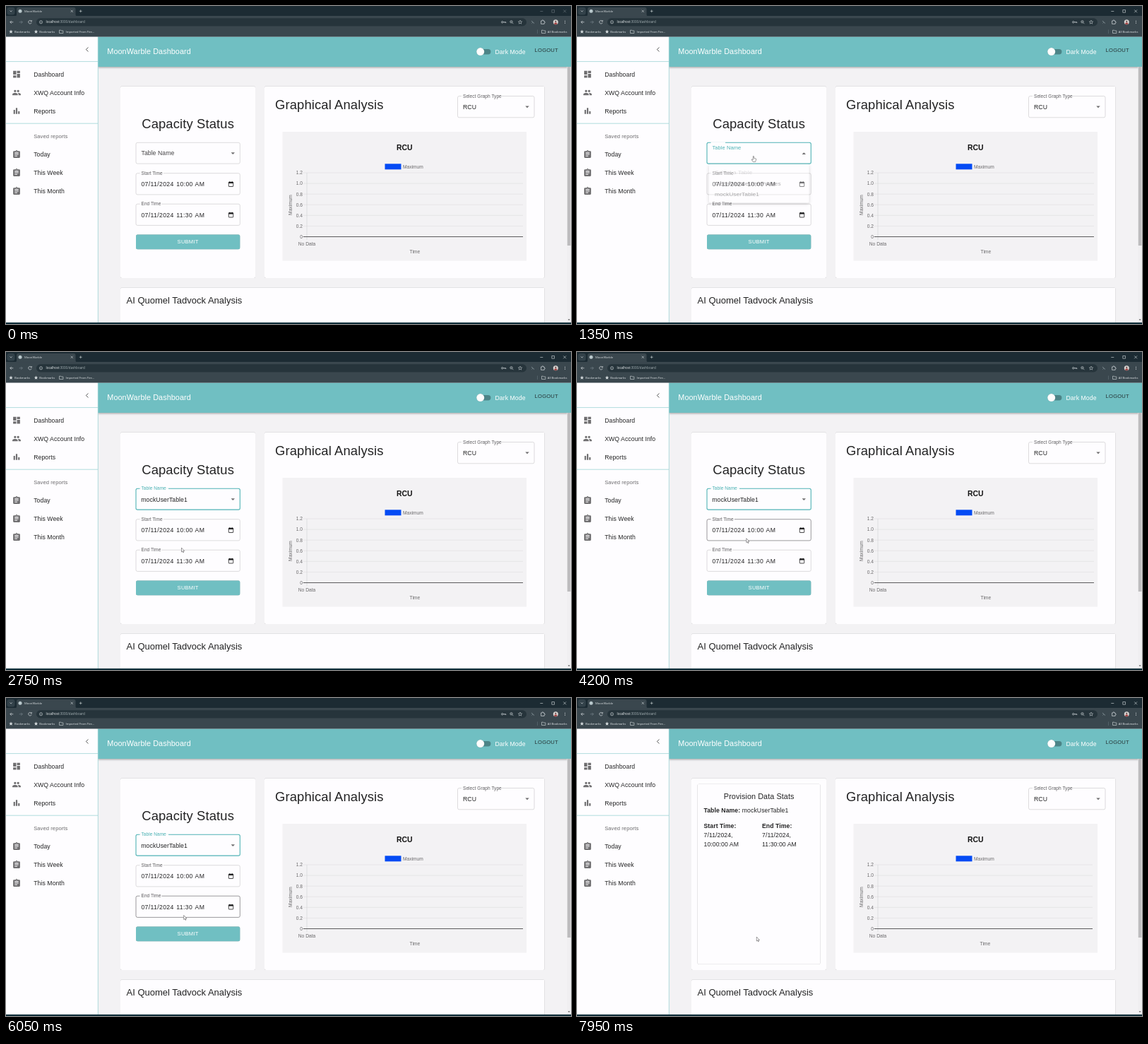
An HTML page that plays this animation: 800 by 450 pixels, repeating every 8 s.

```html
<!DOCTYPE html>
<html lang="en">
<head>
<meta charset="utf-8">
<title>Dashboard</title>
<style>
html, body { margin: 0; width: 100%; height: 100%; overflow: hidden; background: #f3f2f4; }
svg { display: block; width: 800px; height: 450px; }
text { font-family: "Liberation Sans", Arial, sans-serif; white-space: pre; }
.ui text { font-family: "Open Sans", "Noto Sans", sans-serif; }
.card { filter: drop-shadow(0 .7px .6px rgba(0,0,0,.36)); }
.bar { filter: drop-shadow(0 1.2px 1.4px rgba(0,0,0,.35)); }
.pop { filter: drop-shadow(0 2.2px 2.6px rgba(0,0,0,.42)); }
</style>
</head>
<body>
<svg id="stage" viewBox="0 0 800 450"></svg>
<script>
const LOOP = 8000, OPEN = 1250, PICK = 2400, SWAP = 7450;
const TEAL = "#70bfc2", FOCUS = "#4fb3b5", INK = "#232324", GREY = "#6c6b6d", WHITE = "#fefdff", PALE = "#f3f2f4";
const stage = document.getElementById("stage");

function add(parent, tag, attrs = {}, content) {
  const node = document.createElementNS("http://www.w3.org/2000/svg", tag);
  set(node, attrs);
  if (content !== undefined) node.textContent = content;
  return parent.appendChild(node);
}
function set(node, attrs) {
  for (const key in attrs) node.setAttribute(key, attrs[key]);
}
const group = (parent, attrs) => add(parent, "g", attrs);
const rect = (p, x, y, width, height, fill, more) => add(p, "rect", { x, y, width, height, fill, ...more });
const line = (p, d, stroke, width = .6, more) => add(p, "path", { d, stroke, "stroke-width": width, fill: "none", ...more });
const shape = (p, d, fill, more) => add(p, "path", { d, fill, ...more });
const dot = (p, cx, cy, r, fill, more) => add(p, "circle", { cx, cy, r, fill, ...more });
// y is the middle of the capital letters
const text = (p, x, y, str, size, fill = INK, more) =>
  add(p, "text", { x, y: y + size * .36, "font-size": size, fill, ...more }, str);
const body = (p, x, y, str, fill = INK, more) => text(p, x, y, str, 8.67, fill, { "letter-spacing": .08, ...more });
const show = (node, on) => node.setAttribute("visibility", on ? "visible" : "hidden");
const MID = { "text-anchor": "middle" }, END = { "text-anchor": "end" }, BOLD = { "font-weight": 700 };

// ---- page ----
rect(stage, 0, 0, 800, 450, PALE);

const lower = group(stage, { class: "card" });
rect(lower, 162, 398.5, 600.5, 60, WHITE, { rx: 2 });
text(stage, 170.5, 416, "AI Quomel Tadvock Analysis", 13);

for (const [x, w] of [[162, 191], [366, 396.5]])
  rect(stage, x, 113.5, w, 271.5, WHITE, { rx: 2, class: "card" });

// ---- graph ----
text(stage, 381, 139.5, "Graphical Analysis", 18.4, INK, { "letter-spacing": .13 });
field(stage, 639.5, 127.5, 108.5, 30.3, "Select Graph Type", 647, 57);
body(stage, 647, 143, "RCU");
shape(stage, "M735.3 141.6h5.4l-2.7 2.7z", GREY);

rect(stage, 391.5, 178, 345.5, 182.5, PALE);
text(stage, 564.3, 200.5, "RCU", 10.4, "#111", { ...MID, ...BOLD });
rect(stage, 536.5, 223.3, 23, 8, "#044bf4");
const label = (x, y, str, more) => text(stage, x, y, str, 6.65, "#6a696b", more);
label(562, 227.2, "Maximum");
const gridY = i => 236 + i * 15.08;
const grid = line(stage, "", "#dddcde", .6);
["1.2", "1.0", "0.8", "0.6", "0.4", "0.2", "0"].forEach((s, i) => label(420, gridY(i), s, END));
line(stage, "M426 236V331", "#d2d1d3");
const axis = line(stage, "", "#4c4b4d", .9);
label(426, 336.8, "No Data", MID);
const timeLabel = label(578.7, 348, "Time", MID);
label(0, 0, "Maximum", { ...MID, transform: "translate(402.5 281.5) rotate(-90)" });
function drawGrid(right) {
  let d = "";
  for (let i = 0; i < 6; i++) d += `M420.8 ${gridY(i)}H${right}`;
  set(grid, { d });
  set(axis, { d: `M420.8 326.5H${right}` });
  set(timeLabel, { x: 426.3 + (right - 426.3) / 2 - .3 });
}

// ---- form ----
function field(parent, x, y, w, h, name, tx, gap) {
  const frame = rect(parent, x, y, w, h, "none", { rx: 2.2, stroke: "#c6c5c7", "stroke-width": .6 });
  const notch = rect(parent, tx - 2, y - 1, gap, 2, WHITE);
  const caption = text(parent, tx, y - .3, name, 6.5, "#5f5e60", { "letter-spacing": .06 });
  return { frame, notch, caption, y, h };
}
const form = group(stage);
text(form, 257.6, 166.5, "Capacity Status", 18.4, INK, { ...MID, "letter-spacing": .13 });
const table = field(form, 184, 193.3, 147.3, 29.8, "Table Name", 191.5, 40.5);
const tableValue = body(form, 191.3, 208.5, "mockUserTable1");
const tableArrow = shape(form, "M-2.7-1.4h5.4l-2.7 2.7z", GREY);

const dateFields = [["Start Time", 236.7, "10:00"], ["End Time", 280.2, "11:30"]].map(([name, y, clock], i) => {
  const f = field(form, 184, y, 147.3, 30.2, name, 191.5, i ? 31 : 33.5);
  const mid = y + 15.4;
  [[191.4, "07/11/2024"], [241.3, clock], [267.6, "AM"]].forEach(([x, s]) =>
    body(form, x, mid, s, INK, { "letter-spacing": .36 }));
  rect(form, 315.3, mid - 2.9, 6.4, 6.3, "none", { stroke: "#1c1c1d", "stroke-width": .8, rx: .5 });
  rect(form, 315.3, mid - 3, 6.4, 1.9, "#1c1c1d");
  line(form, `M316.7 ${mid - 3.9}v1.4M320.3 ${mid - 3.9}v1.4`, "#1c1c1d", .8);
  return f;
});
const submit = rect(form, 184, 323.6, 147.3, 20.6, TEAL, { rx: 2.2, class: "card" });
text(form, 257.6, 333.6, "SUBMIT", 7.58, "#fff", { ...MID, "letter-spacing": .22 });

// ---- stats ----
const stats = group(stage);
rect(stats, 170.5, 121.8, 174, 255, WHITE, { rx: 2, class: "card" });
text(stats, 257.7, 139.6, "Provision Data Stats", 10.83, INK, { ...MID, "letter-spacing": .08 });
body(stats, 179.5, 158.8, "Table Name:", INK, BOLD);
body(stats, 233.8, 158.8, "mockUserTable1");
[[179.5, "Start Time:", "10:00:00 AM"], [262, "End Time:", "11:30:00 AM"]].forEach(([x, name, clock]) => {
  body(stats, x, 180.8, name, INK, BOLD);
  body(stats, x, 193.8, "7/11/2024,");
  body(stats, x, 206.8, clock);
});

// ---- header ----
rect(stage, 130, 43.5, 670, 42.5, TEAL, { class: "bar" });
text(stage, 143.3, 64.5, "MoonWarble Dashboard", 10.83, "#fff", { "letter-spacing": .08 });
rect(stage, 668, 61, 18.4, 7.4, "#4c8487", { rx: 3.7 });
dot(stage, 671.7, 64.6, 5.5, "#fdfdfd", { class: "card" });
body(stage, 692.5, 64.6, "Dark Mode", "#fff");
text(stage, 748.6, 62.5, "LOGOUT", 7.58, "#263436", { "letter-spacing": .22 });

rect(stage, 794.3, 86, 5.7, 362, "#f0eff1");
rect(stage, 794.8, 86, 4.6, 253, "#bdbcbe");
shape(stage, "M795.6 443.3h3l-1.5 1.8z", "#555");

// ---- sidebar ----
rect(stage, 0, 43.5, 130, 405, WHITE);
line(stage, "M130.3 43.5V448M0 78.6H130M0 166.2H130", "#9ed3d5", .8);
line(stage, "M116.4 58.5l-3 3 3 3", "#555", 1);
const icons = {
  tiles: "M3 13h8V3H3zm0 8h8v-6H3zm10 0h8V11h-8zm0-18v6h8V3z",
  people: "M8 5a3 3 0 1 0 .01 0zM16 5a3 3 0 1 1-.01 0zM8 13c-2.3 0-7 1.2-7 3.5V19h14v-2.5C15 14.200 10.300 13 8 13zm8 0l-1 .1c1.200.8 2 1.900 2 3.400V19h6v-2.500c0-2.300-4.700-3.500-7-3.500z",
  bars: "M4 9h4v11H4zm12 4h4v7h-4zm-6-9h4v16h-4z",
  sheet: "M19 3h-4.200a3 3 0 0 0-5.600 0H5a2 2 0 0 0-2 2v14a2 2 0 0 0 2 2h14a2 2 0 0 0 2-2V5a2 2 0 0 0-2-2zm-7 0a1 1 0 1 1-.01 0zM14 17H7v-2h7zm3-4H7v-2h10zm0-4H7V7h10z"
};
[["tiles", 96.5, "Dashboard"], ["people", 122.5, "XWQ Account Info"], ["bars", 148.5, "Reports"],
 ["sheet", 210, "Today"], ["sheet", 236, "This Week"], ["sheet", 262, "This Month"]].forEach(([icon, y, name]) => {
  shape(stage, icons[icon], "#6f6e70", { transform: `translate(8.5 ${y - 6.5}) scale(.5417)`, "fill-rule": "evenodd" });
  body(stage, 39.2, y, name);
});
text(stage, 39.2, 183.8, "Saved reports", 7.58, GREY, { "letter-spacing": .08 });

// ---- browser frame ----
const ui = group(stage, { class: "ui" });
const LIGHT = "#d9dfe1";
rect(ui, 0, 0, 800, 15, "#1c2b33");
rect(ui, 0, 14, 800, 29.5, "#3a474e");
rect(ui, 1.5, 2, 11, 10.5, "#33424a", { rx: 3 });
line(ui, "M5.500 6.500l1.600 1.500 1.600-1.500", LIGHT, .7);
shape(ui, "M13 14.500q2-.3 2-2.500V4.500q0-2.500 2.500-2.500H96q2.500 0 2.500 2.500V12q0 2.200 2 2.500z", "#3a474e");
dot(ui, 20, 7.300, 2.500, "#b9c8cc");
text(ui, 26, 7.300, "MoonWarble", 4.200, LIGHT);
line(ui, "M91.700 5.700l3.200 3.200m0-3.200l-3.200 3.200M103.800 7.300h3.800m-1.900-1.900v3.800", LIGHT, .6);
const controls = line(ui, "M756.300 7.500h4M772.800 5.500h3.700v3.700h-3.700zM789.200 5.400l3.900 3.900m0-3.900l-3.900 3.900", LIGHT, .6);

rect(ui, 43, 17.300, 694, 11.200, "#26343b", { rx: 5.600 });
line(ui, "M10.300 22.800H5.800m2-2l-2 2 2 2", LIGHT, .7);
line(ui, "M18.800 22.800h4.500m-2-2l2 2-2 2", "#78858b", .7);
line(ui, "M36 21.500a2.300 2.300 0 1 0 .2 2M36.300 20v1.800h-1.800", LIGHT, .7);
dot(ui, 49.500, 22.800, 2.100, "none", { stroke: LIGHT, "stroke-width": .6 });
line(ui, "M49.500 22.500v1.400M49.500 21.500v.5", LIGHT, .5);
const url = text(ui, 56.500, 22.800, "localhost", 4.550, "#f2f5f6");
add(url, "tspan", { fill: "#a9b4b8" }, ":3000/dashboard");
dot(ui, 702.700, 22.800, 1.200, "none", { stroke: LIGHT, "stroke-width": .7 });
line(ui, "M704 22.800h3.800v1.300M706.300 22.800v1", LIGHT, .7);
dot(ui, 715.500, 22.300, 1.700, "none", { stroke: LIGHT, "stroke-width": .6 });
line(ui, "M716.800 23.600l1.600 1.600M714.700 22.300h1.600", LIGHT, .6);
const star = (x, y, fill, stroke) => shape(ui, "M0-2.700L.75-.85 2.700-.75 1.200.5 1.700 2.400 0 1.350-1.700 2.400-1.200.5-2.700-.75-.75-.85z", fill,
  { transform: `translate(${x} ${y})`, stroke, "stroke-width": .5 });
star(728, 22.800, "none", LIGHT);
line(ui, "M744 21l4 3.700m-3.500-.3l1.200-1.100", "#98a6ac", .7);
line(ui, "M757.600 21h1.400q0-1.300.9-1.300t.9 1.300h1.300v1.300q1.200 0 1.200.9t-1.200.9v1.300h-4.500z", LIGHT, .7);
dot(ui, 778.300, 22.800, 3.500, "#d9d5d3");
dot(ui, 778.300, 21.800, 1.100, "#5d4342");
shape(ui, "M776 25.400q.3-2.100 2.300-2.100t2.300 2.100q-2.300 1.500-4.600 0z", "#a34545");
for (const y of [21, 22.800, 24.600]) dot(ui, 791.500, y, .5, LIGHT);

const folder = x => line(ui, `M${x} 34.200h2l.7.8h2.700v3.500h-5.400z`, LIGHT, .6);
const mark = (x, s) => text(ui, x, 36.300, s, 4.150, "#e6eaec");
star(7, 36.300, LIGHT); mark(12, "Bookmarks");
star(42.500, 36.300, LIGHT); mark(47.300, "Bookmarks");
folder(75.500); mark(84.500, "Imported From Fire...");
line(ui, "M752.500 33.500v5.500", "#6b7a81", .5);
folder(758.500); mark(766.800, "All Bookmarks");
rect(stage, 0, 447.800, 800, 2.200, "#12303b");

// ---- menu ----
const menu = group(stage);
rect(menu, 184, 223.800, 147.500, 68, WHITE, { rx: 2.200, class: "pop" });
const highlight = rect(menu, 184, 248, 147.500, 19.500, "#f2f1f3");
body(menu, 192.500, 238.300, "Select a Table", "#a8a7a9");
body(menu, 192.500, 257.800, "MoonWarbleUserProfiles");
body(menu, 192.500, 277.300, "mockUserTable1");

// ---- pointer ----
const pointer = group(stage);
const OUTLINE = { stroke: "#3c3b3d", "stroke-width": .5, "stroke-linejoin": "round" };
const arrow = shape(pointer, "M0 0V6l1.400-1.200.9 2.100.9-.4-.9-2h1.900z", "#fff", OUTLINE);
const hand = shape(pointer, "M-.6.400q.6-.8 1.200 0V3l2.600.6q.7.2.6 1L3.300 6.500 2.800 8.100H-.7L-2.600 5.300q-.1-1 .8-.7l1.200.8z", "#fff", OUTLINE);

const path = [
  [1200, 250, 211], [1650, 249.500, 216], [1950, 248.500, 264], [2000, 248.500, 268], [2200, 248.500, 277],
  [3350, 248.500, 277], [4150, 240.200, 264.500], [4200, 239.800, 263.700], [4350, 239.500, 263], [4650, 239.500, 263],
  [5100, 243, 276], [5250, 243, 276], [6050, 251.700, 307.500], [6300, 251.700, 307.500], [7100, 253.800, 338], [8000, 254.300, 338]
];
const clamp = v => Math.min(1, Math.max(0, v));
const ease = v => v * v * (3 - 2 * v);
const ramp = (t, start, length) => ease(clamp((t - start) / length));
const mix = (a, b, k) => a + (b - a) * k;

function pointerAt(t) {
  const i = path.findIndex(p => p[0] > t);
  if (i < 1) return path[0].slice(1);
  const [a, b] = [path[i - 1], path[i]];
  const k = ease((t - a[0]) / (b[0] - a[0]));
  return [mix(a[1], b[1], k), mix(a[2], b[2], k)];
}
const outline = (frame, stroke, width = .6) => set(frame, { stroke, "stroke-width": width });

function render(t) {
  const [x, y] = pointerAt(t);
  const opened = t >= OPEN, open = opened && t < PICK, done = t >= SWAP;
  const overSubmit = t > 6300 && !done && y > 323.600;

  set(controls, { stroke: opened ? LIGHT : "#6d7a80" });
  show(form, !done);
  show(stats, done);
  drawGrid(done ? 730 : 732);

  const lift = ramp(t, OPEN, 200);
  const size = mix(8.670, 6.500, lift);
  set(table.caption, { y: mix(208.300, 193, lift) + size * .36, "font-size": size, fill: opened ? FOCUS : "#454446" });
  set(table.notch, { width: 40.500 * lift });
  outline(table.frame, opened ? FOCUS : t >= 600 ? "#58575a" : "#c6c5c7", opened ? 1.100 : .6);
  set(tableValue, { opacity: t >= PICK ? 1 : 0 });
  set(tableArrow, { transform: `translate(321.300 208.600) scale(1 ${open ? -1 : 1})` });
  dateFields.forEach(f => {
    const over = t >= PICK + 200 && y >= f.y && y <= f.y + f.h;
    outline(f.frame, over ? "#58575a" : "#c6c5c7");
  });

  const alpha = ramp(t, OPEN, 250) * (1 - ramp(t, PICK, 200));
  const grow = mix(.6, 1, ramp(t, OPEN, 200));
  show(menu, alpha > 0);
  set(menu, { opacity: alpha, transform: `translate(257.700 223.800) scale(${mix(.8, 1, grow)} ${grow}) translate(-257.700 -223.800)` });
  set(highlight, { y: y > 267.500 ? 267.500 : 248, opacity: y > 248 ? 1 : 0 });

  const shade = ramp(t, 6850, 250);
  set(submit, { fill: `rgb(${mix(112, 72, shade)},${mix(191, 130, shade)},${mix(194, 131, shade)})`, class: shade > .5 ? "bar" : "card" });

  show(pointer, t >= 1200);
  set(pointer, { transform: `translate(${x} ${y})` });
  const pointing = t < PICK + 200 || overSubmit;
  set(hand, { opacity: pointing ? 1 : 0 });
  set(arrow, { opacity: pointing ? 0 : 1 });
}

const begin = performance.now();
function tick() {
  render((performance.now() - begin) % LOOP);
  requestAnimationFrame(tick);
}
tick();
</script>
</body>
</html>
```
